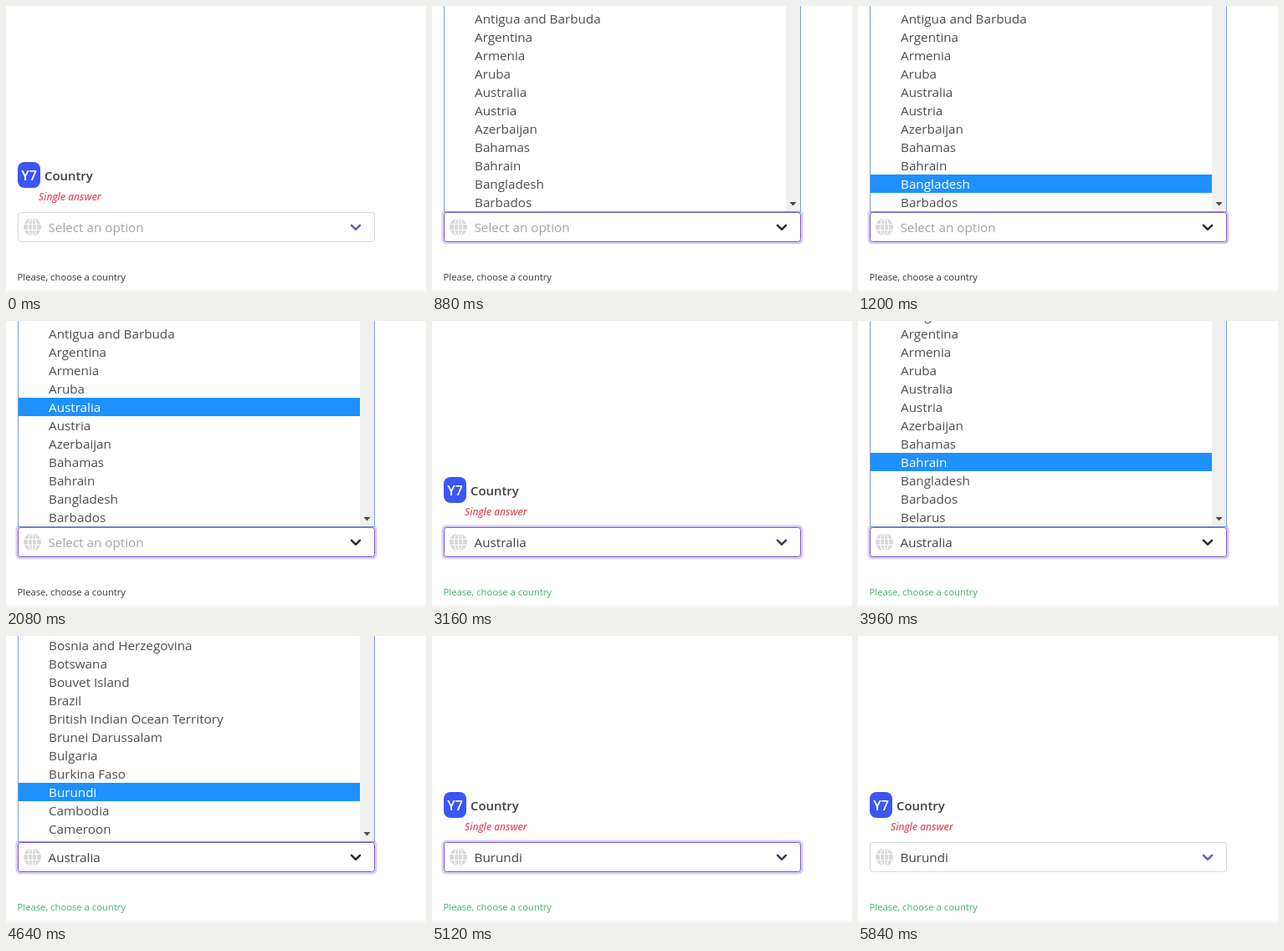
Animation, 502 px wide and 344 px high, one loop 6040 ms. Source, as an HTML page:

```html
<!DOCTYPE html>
<html lang="en">
<head>
<meta charset="utf-8">
<title>Country select</title>
<style>
  html, body { margin: 0; width: 100%; height: 100%; overflow: hidden; background: #fff; }
  svg { display: block; width: 502px; height: 344px; font: 15.25px "Open Sans", "Noto Sans", sans-serif; }
  .badge { font-size: 16px; font-weight: 600; fill: #fff; text-anchor: middle; }
  .title { font-size: 14.9px; font-weight: 600; fill: #3f3f44; }
  .note { font-size: 11.9px; font-weight: 600; font-style: italic; fill: #e5505f; }
  .hint { font-size: 11.27px; }
  .row text { fill: #4a4d52; }
  .row rect { fill: none; }
  .row.on text { fill: #fff; }
  .row.on rect { fill: #1e90ff; }
</style>
</head>
<body>
<svg viewBox="0 0 502 344">
  <defs>
    <clipPath id="view"><rect x="15" y="-1" width="408" height="247"/></clipPath>
    <linearGradient id="shade" x2="0" y2="1">
      <stop offset="0" stop-color="#fff"/>
      <stop offset="1" stop-color="#f1f1f2"/>
    </linearGradient>
  </defs>
  <rect y="339" width="502" height="5" fill="url(#shade)"/>

  <rect x="14" y="187" width="27" height="31" rx="8" fill="#3d55f3"/>
  <text class="badge" x="27.5" y="209">Y7</text>
  <text class="title" x="46" y="209">Country</text>
  <text class="note" x="39" y="233">Single answer</text>
  <text class="hint" id="hint" x="13.5" y="329">Please, choose a country</text>

  <rect id="glow" x="13" y="246" width="429" height="38" rx="4" fill="none" stroke="#d9cdf5" stroke-width="3"/>
  <rect id="field" x="14.5" y="247.5" width="426" height="35" rx="3" fill="#fff"/>
  <circle cx="31.5" cy="265" r="10.5" fill="#d7d7d9"/>
  <g fill="none" stroke="#fff" stroke-width="1.2">
    <ellipse cx="31.5" cy="265" rx="5" ry="10.5"/>
    <path d="M31.5 254V276M21 261.5H42M21 268.5H42"/>
  </g>
  <text id="value" x="50.5" y="271"></text>
  <path id="chevron" d="M413 262.8L418 267.8L423 262.8" fill="none" stroke-width="2.5" stroke-linecap="round" stroke-linejoin="round"/>

  <g id="popup">
    <rect x="14.5" y="-5" width="426" height="251.5" fill="#fff" stroke="#7f9bda"/>
    <rect x="423" y="-1" width="17" height="247" fill="#f0f0f0"/>
    <path d="M427.5 235H435.5L431.5 239.5Z" fill="#4a4a4a"/>
    <g clip-path="url(#view)"><g id="list"></g></g>
  </g>
</svg>
<script>
const LOOP = 6040, ROW = 22, TOP = -194;
const countries = ["", "Afghanistan", "Albania", "Algeria", "American Samoa", "Andorra", "Angola",
  "Anguilla", "Antarctica", "Antigua and Barbuda", "Argentina", "Armenia", "Aruba", "Australia",
  "Austria", "Azerbaijan", "Bahamas", "Bahrain", "Bangladesh", "Barbados", "Belarus", "Belgium",
  "Belize", "Benin", "Bermuda", "Bhutan", "Bolivia", "Bosnia and Herzegovina", "Botswana",
  "Bouvet Island", "Brazil", "British Indian Ocean Territory", "Brunei Darussalam", "Bulgaria",
  "Burkina Faso", "Burundi", "Cambodia", "Cameroon"];

// Tracks are [time, value] points joined by eased segments.
const focusTrack = [[360, 0], [500, 1], [5240, 1], [5400, 0]];
const darkTrack = [[360, 0], [500, 1], [2240, 1], [2500, .75], [3400, .75], [3500, 1], [4960, 1], [5400, 0]];
const firstHover = [[1000, 246], [1200, 212], [1360, 205], [1820, 104]];
const secondHover = [[3640, 246], [3900, 169], [4040, 169], [4500, 187]];
const scrollTrack = [[4000, 22], [4150, 100], [4300, 200], [4450, 300], [4600, 400]];

const $ = id => document.getElementById(id);
const hint = $("hint"), glow = $("glow"), field = $("field"), value = $("value");
const chevron = $("chevron"), popup = $("popup"), list = $("list");

function make(tag, attrs, parent) {
  const el = document.createElementNS("http://www.w3.org/2000/svg", tag);
  for (const key in attrs) el.setAttribute(key, attrs[key]);
  return parent.appendChild(el);
}

const rows = countries.map((name, i) => {
  const y = TOP + i * ROW;
  const row = make("g", { class: "row" }, list);
  make("rect", { x: 15, y, width: 408, height: ROW }, row);
  make("text", { x: 51, y: y + 17 }, row).textContent = name;
  return row;
});

function sample(track, t) {
  if (t <= track[0][0]) return track[0][1];
  for (let i = 1; i < track.length; i++) {
    const [t0, a] = track[i - 1], [t1, b] = track[i];
    if (t < t1) {
      const p = (t - t0) / (t1 - t0);
      return a + (b - a) * p * p * (3 - 2 * p);
    }
  }
  return track[track.length - 1][1];
}

const mix = (a, b, p) => `rgb(${a.map((v, i) => Math.round(v + (b[i] - v) * p))})`;

function render(t) {
  const first = t >= 440 && t < 2240;
  const second = t >= 3440 && t < 4960;
  const chosen = t < 2240 ? 0 : t < 4960 ? 13 : 35;
  const focus = sample(focusTrack, t);

  value.textContent = countries[chosen] || "Select an option";
  value.setAttribute("fill", chosen ? "#414147" : "#a2a2a6");
  hint.setAttribute("fill", chosen ? "#3cb463" : "#34343c");
  glow.setAttribute("opacity", focus);
  field.setAttribute("stroke", mix([214, 214, 219], [122, 88, 200], focus));
  chevron.setAttribute("stroke", mix([112, 80, 202], [42, 42, 46], sample(darkTrack, t)));

  popup.style.display = first || second ? "" : "none";
  if (!first && !second) return;
  const scroll = second ? sample(scrollTrack, t) : 0;
  const hover = second ? secondHover : firstHover;
  const active = t < hover[0][0] ? chosen
    : Math.floor((Math.min(sample(hover, t), 245) - TOP + scroll) / ROW);
  list.setAttribute("transform", `translate(0 ${-scroll})`);
  rows.forEach((row, i) => row.classList.toggle("on", i === active));
}

const start = performance.now();
function tick() {
  render((performance.now() - start) % LOOP);
  requestAnimationFrame(tick);
}
tick();
</script>
</body>
</html>
```
